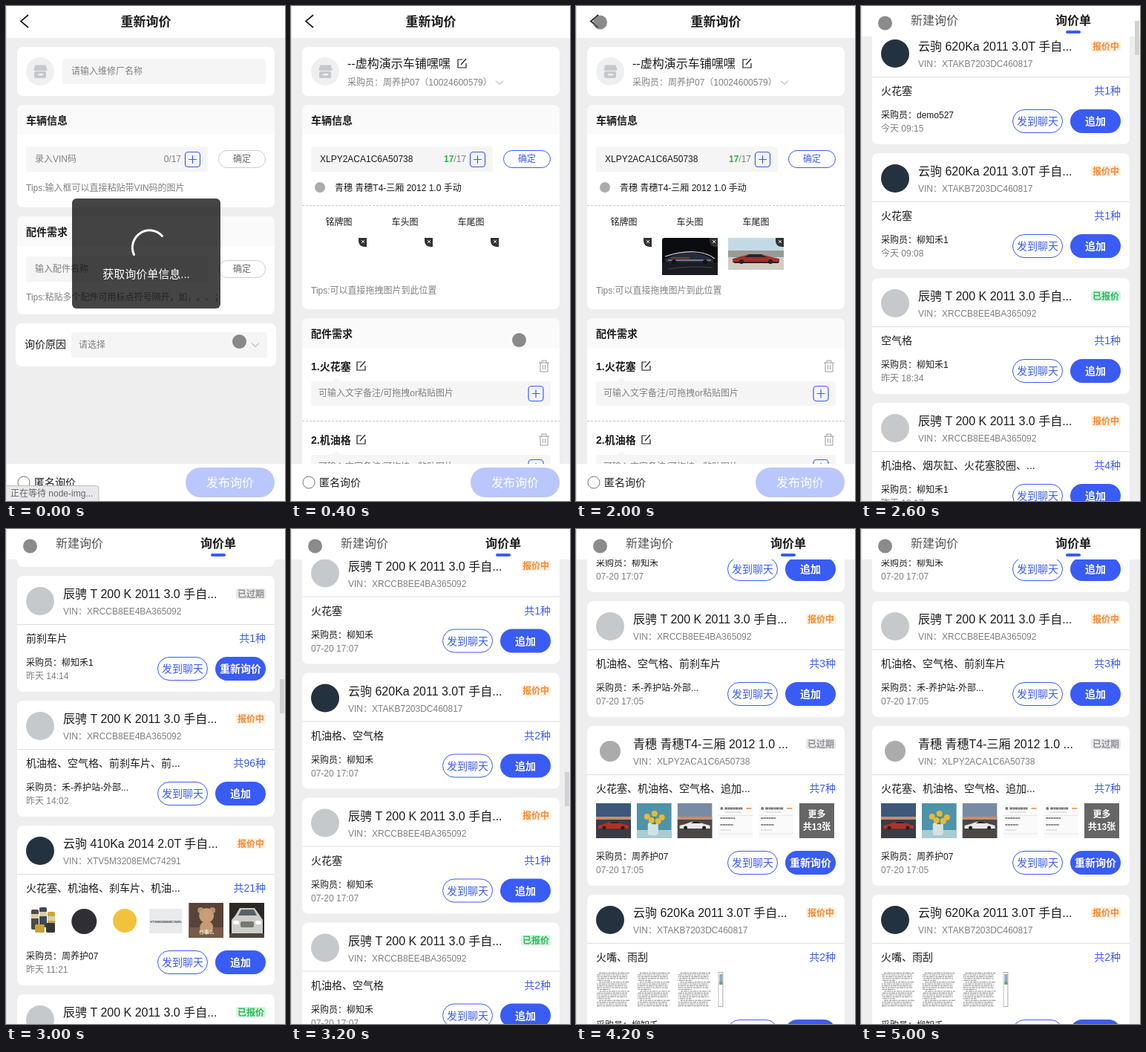
Animation of 376 by 666 pixels, one loop 5.2 s. Source, as an HTML page:

```html
<!DOCTYPE html>
<html lang="zh-CN">
<head>
<meta charset="utf-8">
<title>询价</title>
<style>
html, body { margin: 0; width: 100%; height: 100%; overflow: hidden; background: #eee; }
#stage { display: block; width: 100vw; height: 100vh; }
text {
  font-family: "Liberation Sans", "Noto Sans CJK SC", "Noto Sans CJK", sans-serif;
  text-spacing-trim: space-all;
}
</style>
</head>
<body>
<svg id="stage" viewBox="0 0 376 666"></svg>
<script>
const BLUE = '#3a5cf6', INK = '#1c1c1e', GREY = '#808080';

// Drawing helpers
const rect = (x, y, w, h, fill, r = 0, more = '') =>
  `<rect x="${x}" y="${y}" width="${w}" height="${h}" rx="${r}" fill="${fill}" ${more}/>`;
const circle = (x, y, r, fill, more = '') =>
  `<circle cx="${x}" cy="${y}" r="${r}" fill="${fill}" ${more}/>`;
const path = (d, fill) => `<path d="${d}" fill="${fill}"/>`;
const line = (d, color, width = 1, more = '') =>
  `<path d="${d}" fill="none" stroke="${color}" stroke-width="${width}" ${more}/>`;
const text = (x, y, size, fill, str, more = '') =>
  `<text x="${x}" y="${y}" font-size="${size}" fill="${fill}" ${more}>${str}</text>`;
const MID = ' text-anchor="middle"', END = ' text-anchor="end"', BOLD = ' font-weight="600"';
const frame = (x, y, w, h, body) => `<svg x="${x}" y="${y}" width="${w}" height="${h}">${body}</svg>`;

// Icons
const chevron = (x, y) => line(`M${x - 5} ${y - 2.5}l5 5 5-5`, '#999');
const plus = (x, y) => rect(x - 10, y - 10, 20, 20, 'none', 4, `stroke="${BLUE}" stroke-width="1.2"`) +
  line(`M${x - 5.5} ${y}h11M${x} ${y - 5.5}v11`, BLUE, 1.2);
const edit = (x, y) =>
  line(`M${x + 7} ${y + 1}h-6v11h11v-6M${x + 5} ${y + 8}l7-8`, INK, 1.2);
const trash = (x, y) =>
  line(`M${x} ${y + 3}h14M${x + 4} ${y + 3}v-3h6v3M${x + 2} ${y + 3}v12h10v-12M${x + 5.5} ${y + 6}v6M${x + 8.5} ${y + 6}v6`, '#999');
const shop = circle(46, 88, 19, '#eeeff1') +
  rect(38, 88, 16, 9, '#c5c7cb', 2) + path('M39.5 79.5h14l2 6q-1 3-4 3h-10q-3 0-4-3z', '#c5c7cb') +
  line('M37 87.5h19', '#eeeff1') + rect(43, 91, 7, 2.5, '#eeeff1', 1);
const closeCorner = x => path(`M${x} 312h11v12h-3q-8-1-8-8z`, '#333') +
  line(`M${x + 4} 315l4 4m0-4l-4 4`, '#fff', .9);

// Enquiry form
const field = (y, w, x = 27, h = 34) => rect(x, y, w, h, '#f5f5f5', 3);
const panel = (y, h, title) => rect(15, y, 347, h, '#fff', 8) + rect(15, y, 347, 40, '#fafafa', 8) +
  rect(15, y + 20, 347, 20, '#fafafa') + text(27, y + 26, 14, INK, title, BOLD);
const confirm = (y, border, color) =>
  rect(286.5, y + .5, 63, 23, '#fff', 11.5, `stroke="${border}"`) + text(318, y + 16, 12, color, '确定', MID);
const hint = (y, str) => text(27, y, 12, GREY, str);
const dashes = y => line(`M15 ${y}h347`, '#c4c4c4', 1, 'stroke-dasharray="3 2"');

const formHeader = rect(0, 0, 376, 43, '#fff') + line('M30 12l-10 8.5 10 8.5', INK, 1.7) +
  text(188.5, 27, 17, INK, '重新询价', MID + BOLD);
const formFooter = rect(0, 616, 376, 50, '#fff') + circle(24, 641, 8, '#fff', 'stroke="#777"') +
  text(38, 646, 14, INK, '匿名询价') + rect(242, 621, 120, 40, '#bac7fc', 20) +
  text(302, 647, 16, '#fff', '发布询价', MID);
const shopCard = rect(15, 55, 347, 66, '#fff', 8) + shop;

const loadingForm = shopCard + field(71, 274, 76) + text(88, 92, 12, GREY, '请输入维修厂名称') +
  panel(133, 138, '车辆信息') + field(189, 245) + text(39, 210, 12, GREY, '录入VIN码') +
  text(236, 210, 12, GREY, '0/17', END) + plus(251.5, 206.5) + confirm(194, '#ccc', '#666') +
  hint(249, 'Tips:输入框可以直接粘贴带VIN码的图片') +
  panel(283, 132, '配件需求') + field(337, 245) + text(39, 358, 12, GREY, '输入配件名称') +
  confirm(342, '#ccc', '#666') + hint(396, 'Tips:粘贴多个配件可用标点符号隔开，如，。、；') +
  rect(13, 427, 351, 58, '#fff', 8) + text(25, 460, 14, INK, '询价原因') + field(439, 264, 88) +
  text(98, 460, 12, GREY, '请选择') + chevron(336, 456) + formHeader + formFooter +
  rect(89, 259, 200, 148, 'rgba(0,0,0,.73)', 6) +
  `<g id="spinner">${line('M172.5 334.5A23 23 0 0 1 210.5 309.5', '#fff', 3, 'stroke-linecap="round"')}</g>` +
  text(189, 366, 15, '#fff', '获取询价单信息...', MID) +
  rect(-4, 645.5, 129, 25, '#e7e9ec', 4, 'stroke="#bbb"') + text(6, 660, 12, '#666', '正在等待 node-img...');

const partRow = (y, name) => text(27, y + 30, 14, INK, name, BOLD) + edit(88, y + 18) + trash(334, y + 17) +
  field(y + 45, 323, 27, 33) + path(`M55 ${y + 45}l6-5 6 5z`, '#f5f5f5') +
  text(37, y + 65, 12, GREY, '可输入文字备注/可拖拽or粘贴图片') + plus(330, y + 61.5) + dashes(y + 98.5);

const nightCar = frame(116, 312, 75, 50, rect(0, 0, 75, 50, '#0b0c10', 3) +
  path('M0 33h75v17H0z', '#1b1c21') + path('M3 29q13-7 31-10 20 1 35 10v4H5z', '#252b38') +
  line('M4 25q25-8 42-6t25 9', '#c9d0df', 1.1) + line('M8 30h58', '#8f96a8', 1.3) +
  line('M12 27h25', '#c0503c', 1) + circle(16, 32, 3, '#111') + circle(58, 32, 3, '#111') +
  line('M8 42q30-5 60-2', '#44464e'));
const dayCar = frame(205, 312, 75, 43, rect(0, 0, 75, 43, '#c3dae6') + rect(0, 17, 75, 9, '#9a9a94') +
  rect(0, 27, 75, 16, '#d3ccc3') + path('M6 28q14-4 22-6h17q11 4 24 6v5H6z', '#a52f2d') +
  path('M29 22h15l8 4H22z', '#22262c') + rect(8, 32, 60, 2, '#292321') +
  circle(18, 32, 3, '#222') + circle(57, 32, 3, '#222'));

const filledForm = shopCard + text(76, 83, 16, INK, '--虚构演示车铺嘿嘿') + edit(224, 71) +
  text(76, 107, 12, GREY, '采购员：周养护07（10024600579）') + chevron(281, 103) +
  panel(133, 275, '车辆信息') + field(189, 245) + text(39, 210, 12, INK, 'XLPY2ACA1C6A50738') +
  text(236, 210, 12, GREY, `<tspan fill="#28b24a" ${BOLD}>17</tspan>/17`, END) +
  plus(251.5, 206.5) + confirm(194, BLUE, BLUE) + circle(39, 244, 7, '#a9abad') +
  text(59, 249, 12, INK, '青穗 青穗T4-三厢 2012 1.0 手动') + dashes(268.5) +
  ['铭牌图', '车头图', '车尾图'].map((s, i) => text(46.5 + 89 * i, 295, 12, INK, s)).join('') +
  `<g id="photos">${nightCar + dayCar}</g>` + [91, 180, 269].map(closeCorner).join('') +
  hint(387, 'Tips:可以直接拖拽图片到此位置') +
  panel(420, 260, '配件需求') + partRow(460, '1.火花塞') + partRow(559, '2.机油格') + formHeader + formFooter;

// Thumbnails, each in a 47 by 47 box
const back = color => rect(0, 0, 47, 47, color);
const sunsetCar = (sky, ground, body) => back(sky) + rect(0, 18, 47, 5, '#c58d72') + rect(0, 22, 47, 25, ground) +
  path('M3 30q9-2 16-5h9q8 3 16 5v4H3z', body) + path('M18 27l4-2h6l5 2z', '#22262c') +
  circle(11, 33, 2.5, '#222') + circle(36, 33, 2.5, '#222');
const screenshot = back('#fafafa') + circle(5, 7, 2, '#777') + line('M9 7h24', '#777', 3, 'stroke-dasharray="4 .6 2 .4"') +
  line('M38 7h7', '#f2a45c', 2) + line('M9 12h22M3 36h15', '#ccc', 1.2) +
  line('M3 20h20M3 29h18', '#888', 2.2, 'stroke-dasharray="3 .5"') + line('M0 16.5h47M0 41h47', '#e6e6e6');
const page = back('#fff') + Array.from({ length: 19 }, (_, i) =>
  line(`M${i % 5 ? 1 : 4} ${1.5 + i * 2.45}h${i % 5 == 4 ? 18 : 41}`, '#808080', 1,
    `stroke-dasharray="3 .8 5 .7 2 1" stroke-dashoffset="${i * 3.7}"`)).join('');
const bottles = back('#fff') + [[7, 9, '#4d4b43'], [18, 6, '#3d4858'], [29, 12, '#c9a63c']].map(([x, y, c]) =>
  rect(x, y, 10, 27, c, 2) + rect(x, y + 6, 10, 6, '#d9cfa5')).join('') +
  rect(12, 29, 13, 11, '#c8a133', 2) + rect(27, 27, 12, 13, '#33363a', 2);
const numberPlate = rect(2, 8, 44, 33, '#e8eaec') + text(24, 27, 4, '#333', 'XTV5M3208EMC74291', MID + BOLD);
const plushToy = back('#574338') + rect(0, 33, 47, 14, '#775a48') + circle(16, 10, 4, '#b98e6a') + circle(32, 10, 4, '#b98e6a') +
  circle(24, 17, 10, '#c99d77') + circle(24, 33, 9, '#c79a75') + text(24, 42, 7, '#fff', '有事么', MID);
const whiteCar = back('#2c2826') + path('M8 17l6-10h20l7 10 4 6v18H3V23z', '#cfcdca') + path('M12 17l4-8h17l4 8z', '#596068') +
  rect(15, 25, 18, 8, '#777', 2) + rect(5, 24, 8, 5, '#fff', 2) + rect(35, 24, 8, 5, '#fff', 2) + rect(0, 41, 47, 6, '#4d443e');
const flowers = back('#4f93a8') + rect(0, 36, 47, 11, '#a9cbd2') + rect(15, 26, 14, 17, '#d3e3e4', 3) +
  line('M22 28L14 18M23 28l1-14M24 28l10-8', '#497a3f', 2) +
  [[14, 18], [24, 14], [34, 19], [20, 23], [29, 24]].map(([x, y]) => circle(x, y, 4, '#e6bb38')).join('');
const more = back('#666') + text(23.5, 19, 12, '#fff', '更多', MID + BOLD) + text(23.5, 36, 12, '#fff', '共13张', MID + BOLD);
const brokenStrip = rect(.5, .5, 6, 46, '#fff', 0, 'stroke="#aaa"') + rect(2, 3, 4, 14, '#8ba9cf') + rect(2, 13, 4, 4, '#6ba55a');

const partPhotos = [bottles, back('#fff') + circle(23.5, 25, 17, '#302e35'),
  back('#fff') + circle(23.5, 24, 16, '#f2c23d'), numberPlate, plushToy, whiteCar];
const tripPhotos = [sunsetCar('#3d5878', '#393c44', '#b53027'), flowers,
  sunsetCar('#788ba5', '#4c4744', '#e8e8e8'), screenshot, screenshot, more];
const paperPhotos = [page, page, page, brokenStrip];

// Enquiry list
const cars = {
  k6: ['云驹 620Ka 2011 3.0T 手自...', 'XTAKB7203DC460817', '#23323e', 19],
  k4: ['云驹 410Ka 2014 2.0T 手自...', 'XTV5M3208EMC74291', '#23323e', 19],
  t2: ['辰骋 T 200 K 2011 3.0 手自...', 'XRCCB8EE4BA365092', '#c6c9cb', 19],
  q: ['青穗 青穗T4-三厢 2012 1.0 ...', 'XLPY2ACA1C6A50738', '#a9abad', 14],
};
const states = {
  报价中: ['#f98a30', '#fff1e4'], 已报价: ['#2fb85c', '#d5f4df'], 已过期: ['#919196', '#e9e9eb'],
};
const keeper = '柳知禾', mechanic = '周养护07', station = '禾-养护站-外部...';
const fixedRows = {
  0: ['k6', '报价中', '火花塞', 1, 'demo527', '今天 09:15'],
  1: ['k6', '报价中', '火花塞', 1, keeper + 1, '今天 09:08'],
  2: ['t2', '已报价', '空气格', 1, keeper + 1, '昨天 18:34'],
  3: ['t2', '报价中', '机油格、烟灰缸、火花塞胶圈、...', 4, keeper + 1, '昨天 18:17'],
  16: ['t2', '已过期', '前刹车片', 1, keeper + 1, '昨天 14:14'],
  17: ['t2', '报价中', '机油格、空气格、前刹车片、前...', 96, station, '昨天 14:02'],
  18: ['k4', '报价中', '火花塞、机油格、刹车片、机油...', 21, mechanic, '昨天 11:21', partPhotos],
  19: ['t2', '已报价', '空气格', 1, keeper + 1, '昨天 11:08'],
  37: ['t2', '报价中', '机油格、空气格、前刹车片', 3, station, '07-20 17:05'],
  38: ['q', '已过期', '火花塞、机油格、空气格、追加...', 7, mechanic, '07-20 17:05', tripPhotos],
  39: ['k6', '报价中', '火嘴、雨刮', 2, keeper, '07-20 17:05', paperPhotos],
};
const fillerRow = i => [i % 3 ? 't2' : 'k6', i % 4 == 1 ? '已报价' : '报价中', i % 2 ? '机油格、空气格' : '火花塞',
  1 + i % 2, i > 19 ? keeper : keeper + 1, i > 19 ? '07-20 17:07' : '昨天 16:20'];

function card(y, [car, state, parts, count, buyer, time, photos]) {
  const [name, vin, color, radius] = cars[car], [ink, tint] = states[state];
  const low = y + (photos ? 59 : 0);
  return rect(15, y, 347, 156 + low - y, '#fff', 8) + circle(46, y + 34, radius, color) +
    text(77, y + 30, 16, INK, name) + text(77, y + 52, 12, GREY, 'VIN：' + vin) +
    rect(310, y + 17, 40, 14, tint, 2) + text(330, y + 28.5, 12, ink, state, MID + BOLD) +
    line(`M15 ${y + 65.5}h347`, '#ddd') + text(27, y + 89, 14, INK, parts) +
    text(350, y + 89, 14, BLUE, `共${count}种`, END) +
    (photos || []).map((p, i) => frame(27 + 54.8 * i, y + 104, 47, 47, p)).join('') +
    text(27, low + 121, 12, INK, '采购员：' + buyer) + text(27, low + 139, 12, GREY, time) +
    rect(204.5, low + 109.5, 67, 31, '#fff', 15.5, `stroke="${BLUE}"`) +
    text(238, low + 130, 14, BLUE, '发到聊天', MID + ' font-weight="500"') + rect(282, low + 109, 68, 32, BLUE, 16) +
    text(316, low + 130, 14, '#fff', state == '已过期' ? '重新询价' : '追加', MID + BOLD);
}

const tops = [];
let cards = '', nextTop = 0;
for (let i = 0; i < 40; i++) {
  const row = fixedRows[i] || fillerRow(i);
  tops.push(nextTop);
  cards += card(nextTop, row);
  nextTop += row[6] ? 227 : 168;
}
const list = `<g id="cards">${cards}</g>` + rect(0, 0, 376, 41, '#fff') + text(67, 25, 16, '#555', '新建询价') +
  text(286, 25, 16, INK, '询价单', MID + BOLD) + rect(276, 33, 20, 4, BLUE, 2) +
  rect(369, 0, 6, 46, '#d2d2d2', 0, 'id="thumb"');

const stage = document.getElementById('stage');
stage.innerHTML = rect(0, 0, 376, 666, '#eee') + `<g id="loading">${loadingForm}</g><g id="form">${filledForm}</g>` +
  `<g id="list">${list}</g>` + line('M.5 0v666', '#ddd') +
  circle(0, 0, 9.5, '#626262', 'id="cursor" fill-opacity=".74"');

// Motion
const $ = id => document.getElementById(id);
const show = (id, on) => $(id).setAttribute('display', on ? 'inline' : 'none');
const move = (id, x, y) => $(id).setAttribute('transform', `translate(${x} ${y})`);
const mix = (a, b, p) => a + (b - a) * p;
const span = (t, from, to) => Math.min(1, Math.max(0, (t - from) / (to - from)));
const track = (t, a, b, c) => t < 3000 ? mix(a, b, span(t, 2600, 3000)) : mix(b, c, span(t, 3000, 3400));

function draw(t) {
  show('loading', t < 400);
  show('form', t >= 400 && t < 2600);
  show('list', t >= 2600);
  show('photos', t >= 1200);
  show('thumb', t < 4000);
  $('spinner').setAttribute('transform', `rotate(${t * .45} 189 318)`);
  move('cards', 0, track(t, 30, 63 - tops[16], 97 - tops[37]));
  move('thumb', 0, track(t, 20, 202, 452));
  const p = span(t, 400, 1400), eased = p * p * (3 - 2 * p);
  const startX = mix(314.5, 307.5, span(t, 0, 400)), startY = mix(451.5, 449.5, span(t, 0, 400));
  move('cursor', mix(startX, 32.5, eased), mix(startY, t < 2600 ? 22 : 23, eased));
}

const STEP = 200, LOOP = 5200;
const begin = performance.now();
function tick() {
  const elapsed = (performance.now() - begin) % LOOP;
  draw(Math.floor(elapsed / STEP) * STEP);
  requestAnimationFrame(tick);
}
tick();
</script>
</body>
</html>
```
